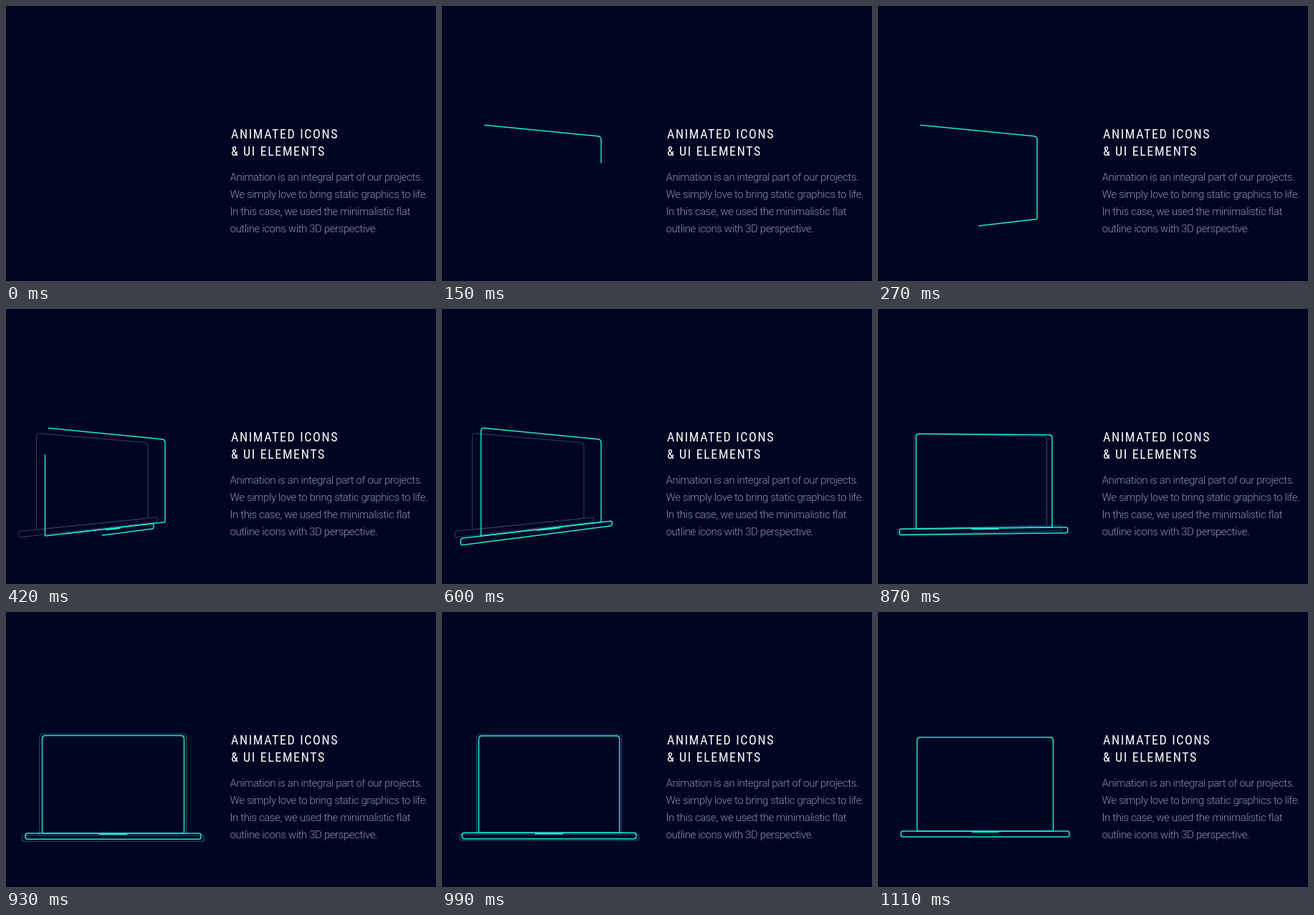
Write an HTML page that moves like this. It is 600x384 px and loops after 1650 ms.

```html
<!DOCTYPE html>
<html lang="en">
<head>
<meta charset="utf-8">
<title>Animated icons</title>
<style>
  html, body { margin: 0; width: 100%; height: 100%; overflow: hidden; background: #000522; }
  svg { display: block; width: 600px; height: 384px; }
  path { fill: none; stroke-linejoin: round; }
  .title { font: 400 18px "Roboto Condensed", Roboto, sans-serif; font-stretch: 75%; letter-spacing: 1.6px; fill: #fff; }
  .body { font: 300 15px Roboto, sans-serif; letter-spacing: -.4px; fill: #8c8fab; }
  .main { stroke: #1ae9d1; stroke-width: 1.5; }
  #echo { stroke-width: 1.3; }
  #notch { stroke-width: 2.2; }
</style>
</head>
<body>
<svg viewBox="0 0 600 384">
  <g id="echo">
    <path id="echoScreen"/>
    <path id="echoBase"/>
  </g>
  <g class="main">
    <path id="screen" pathLength="1"/>
    <path id="base" pathLength="1"/>
    <path id="notch"/>
  </g>
  <g class="title">
    <text x="314" y="185">ANIMATED ICONS</text>
    <text x="314" y="209">&amp; UI ELEMENTS</text>
  </g>
  <g class="body">
    <text x="312.5" y="244">Animation is an integral part of our projects.</text>
    <text x="312.5" y="268">We simply love to bring static graphics to life.</text>
    <text x="312.5" y="292">In this case, we used the minimalistic flat</text>
    <text x="312.5" y="316">outline icons with 3D perspective.</text>
  </g>
</svg>
<script>
const LOOP = 1650, STEP = 30;
const FOCUS = 354;                 // camera distance
const GAP = 44;                    // how far the echo lies behind the laptop
const CENTRE = { x: 149.5, y: 235 };
const TURN = Math.PI / 6;

// Sizes relative to the centre of the view.
const SCREEN = { half: 95, top: -60, bottom: 71, radii: [4.5, 1.5] };
const BASE = { half: 117.5, top: 71, bottom: 79, radii: [2.8, 2.8] };
const NOTCH = { half: 19, y: 72 };

const $ = id => document.getElementById(id);
const progress = (t, from, to) => Math.max(0, Math.min(1, (t - from) / (to - from)));
const mix = (a, b, k) => a + (b - a) * k;
const smooth = k => k * k * (3 - 2 * k);
const backOut = k => 1 + 1.9 * (k - 1) ** 3 + .9 * (k - 1) ** 2;
const swell = k => Math.sin(Math.PI * Math.sqrt(k));

// Returns a function that turns, scales and projects a point of the laptop.
function camera(yaw, size, depth) {
  const sin = Math.sin(yaw), cos = Math.cos(yaw);
  return (x, y) => {
    const scale = FOCUS / (FOCUS + x * size * sin + depth * cos);
    return [
      CENTRE.x + (x * size * cos - depth * sin) * scale,
      CENTRE.y + y * size * scale
    ];
  };
}

// Clockwise rounded outline that starts just after the top left corner.
function outline(project, { half, top, bottom, radii }, stretch = 1) {
  const w = half * stretch;
  const corners = [project(-w, top), project(w, top), project(w, bottom), project(-w, bottom)];
  const towards = (i, j) => {
    const [x, y] = corners[i], [u, v] = corners[j];
    const k = Math.min(radii[i >> 1] / (Math.hypot(u - x, v - y) || 1), .5);
    return [mix(x, u, k), mix(y, v, k)];
  };
  let d = 'M' + towards(0, 1);
  for (const i of [1, 2, 3, 0]) {
    d += 'L' + towards(i, (i + 3) % 4) + 'Q' + corners[i] + ' ' + towards(i, (i + 1) % 4);
  }
  return d + 'Z';
}

function trim(path, amount) {
  path.style.visibility = amount > 0 ? 'visible' : 'hidden';
  path.setAttribute('stroke-dasharray', amount < 1 ? amount + ' 2' : 'none');
}

function draw(t) {
  const turn = progress(t, 750, 900);
  const bounce = swell(progress(t, 870, 1110));
  const stretch = backOut(progress(t, 366, 630));

  const front = camera(TURN * (1 - smooth(turn)), 1 + .042 * bounce, 0);
  const behind = camera(TURN * (1 - turn), (1 + turn * GAP / FOCUS) * (1 + .08 * bounce), GAP);

  $('screen').setAttribute('d', outline(front, SCREEN));
  $('base').setAttribute('d', outline(front, BASE, stretch));
  $('echoScreen').setAttribute('d', outline(behind, SCREEN));
  $('echoBase').setAttribute('d', outline(behind, BASE));

  const notch = NOTCH.half * stretch;
  $('notch').setAttribute('d', 'M' + front(-notch, NOTCH.y) + 'L' + front(notch, NOTCH.y));
  $('notch').style.visibility = t > 366 ? 'visible' : 'hidden';

  trim($('screen'), progress(t, 0, 450));
  trim($('base'), progress(t, 366, 437));

  const shade = [mix(46, 26, turn), mix(48, 72, turn), mix(80, 92, turn)];
  $('echo').style.stroke = `rgb(${shade.map(Math.round)})`;
  $('echo').style.opacity = t < 1110 ? progress(t, 300, 410) : 0;
}

const start = performance.now();
function tick() {
  const t = (performance.now() - start) % LOOP;
  draw(Math.floor(t / STEP) * STEP);
  requestAnimationFrame(tick);
}
tick();
</script>
</body>
</html>
```
